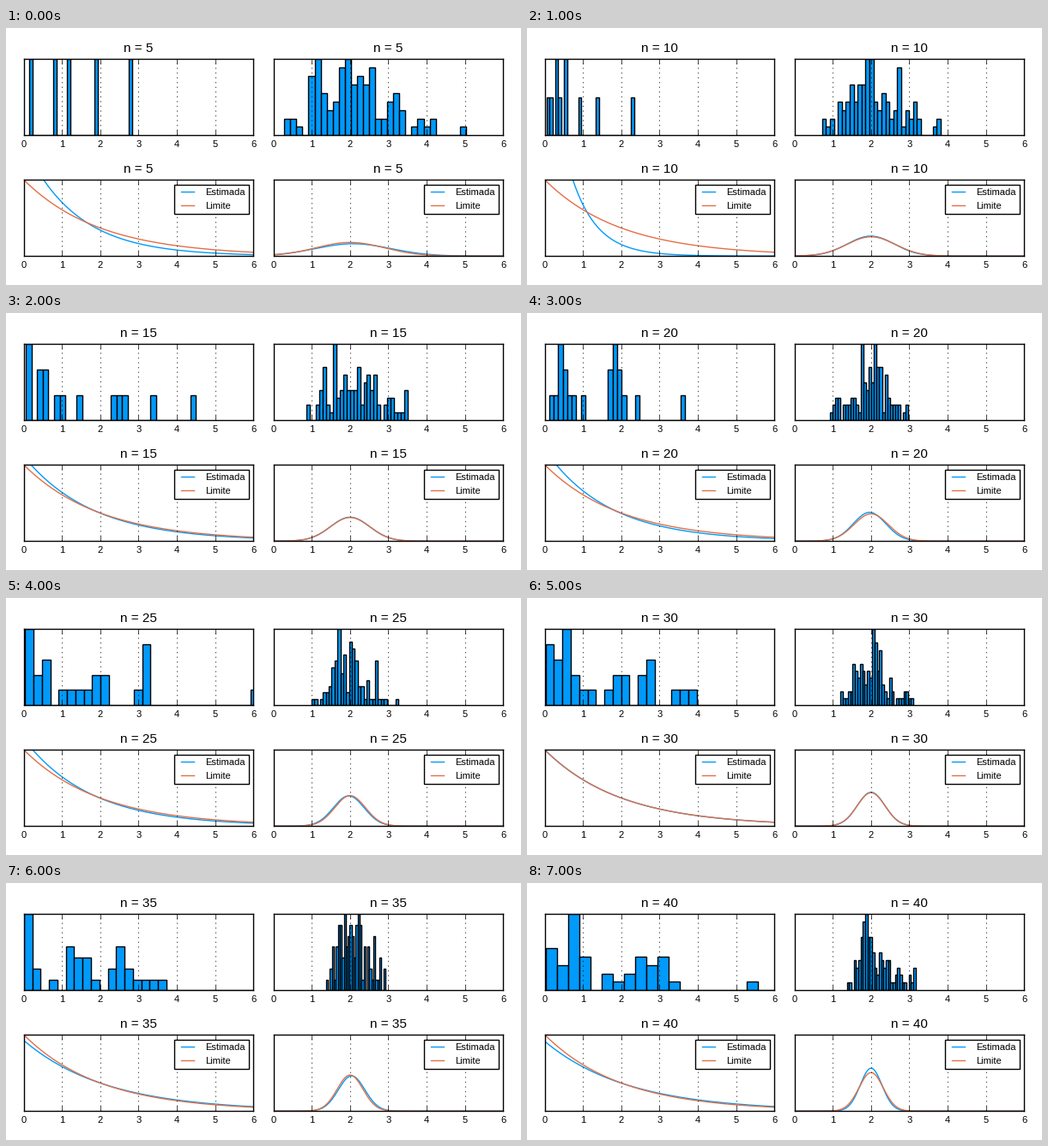
A matplotlib script that plays this animation: 600 by 300 pixels, repeating every 8000 ms.

```python
import numpy as np
import matplotlib.pyplot as plt
from matplotlib.animation import FuncAnimation

W, H, DPI = 600, 300, 100
BLUE, ORANGE = "#009afa", "#e26f47"
XMAX, BINS, MEAN, TRIALS = 6, 30, 2.0, 100

plt.rcParams.update({
    "font.family": "Liberation Sans",
    "lines.scale_dashes": False,
    "lines.linewidth": 1.0,
    "patch.linewidth": 1.0,
    "axes.linewidth": 1.0,
    "axes.axisbelow": False,
})

# n: sample range, sample mean, range of means, mean and spread of means
STAGES = {
    5: ((0.135, 2.84), 1.37, (0.28, 5.03), 2.08, 0.99),
    10: ((0.045, 2.33), 0.67, (0.72, 3.82), 1.99, 0.61),
    15: ((0.05, 4.5), 1.8, (0.85, 3.5), 2.0, 0.51),
    20: ((0.112, 3.67), 1.67, (0.93, 2.96), 1.96, 0.424),
    25: ((0.038, 6.59), 1.75, (0.99, 3.26), 1.965, 0.403),
    30: ((0.02, 6.6), 2.0, (1.2, 3.1), 2.0, 0.36),
    35: ((0.0, 6.585), 2.16, (1.37, 2.92), 2.04, 0.346),
    40: ((0.018, 8.8), 2.19, (1.37, 3.16), 2.0, 0.284),
}

fig = plt.figure(figsize=(W / DPI, H / DPI), dpi=DPI, facecolor="white")
xs = np.linspace(0, XMAX, 400)


def panel(x, y, w=267.42, h=89):
    return fig.add_axes([x / W, 1 - (y + h) / H, w / W, h / H])


COL1, COL2, ROW1, ROW2 = 20.74, 311.74, 36.3, 177.2
hist_sample, hist_means = panel(COL1, ROW1), panel(COL2, ROW1)
pdf_sample, pdf_means = panel(COL1, ROW2), panel(COL2, ROW2)


def spread(values, span, center):
    """Move values so that their ends meet span and their mean meets center."""
    knots = [values.min(), values.mean(), values.max()]
    return np.interp(values, knots, [span[0], center, span[1]])


def expo(mean):
    return np.exp(-xs / mean) / mean


def normal(mu, sd):
    return np.exp(-0.5 * ((xs - mu) / sd) ** 2) / (sd * np.sqrt(2 * np.pi))


def frame(ax, n, top):
    ax.set_xlim(0, XMAX)
    ax.set_ylim(0, top)
    ax.set_yticks([])
    ax.set_xticks(range(XMAX + 1))
    ax.tick_params(axis="x", direction="in", top=True, length=4, width=0.5,
                   pad=4, labelsize=8)
    ax.grid(axis="x", color="black", lw=0.5, ls=(0, (1, 3)))
    ax.set_title(f"n = {n}", fontsize=11, pad=6, y=1.0)


def draw_hist(ax, n, values, span):
    counts, _, _ = ax.hist(values, BINS, range=span, fc=BLUE, ec="black")
    frame(ax, n, counts.max())


def draw_curves(ax, n, estimate, limit, top):
    ax.plot(xs, estimate, color=BLUE, label="Estimada")
    ax.plot(xs, limit, color=ORANGE, label="Limite")
    ax.legend(loc="upper right", fontsize=8, numpoints=2, fancybox=False,
              framealpha=1, edgecolor="black")
    frame(ax, n, top)


def update(i):
    n = 5 * (i + 1)
    span, mean, means_span, mu, sd = STAGES[n]
    rng = np.random.default_rng(n)
    sample = spread(rng.exponential(mean, n), span, mean)
    means = spread(rng.normal(mu, sd, TRIALS), means_span, mu)

    for ax in fig.axes:
        ax.clear()
    draw_hist(hist_sample, n, sample, span)
    draw_hist(hist_means, n, means, means_span)
    draw_curves(pdf_sample, n, expo(mean), expo(MEAN), 0.5)
    draw_curves(pdf_means, n, normal(mu, sd),
                normal(MEAN, MEAN / np.sqrt(n)), 2.5)
    return []


anim = FuncAnimation(fig, update, frames=len(STAGES), interval=1000,
                     repeat=True, repeat_delay=0, init_func=lambda: update(0))
plt.show()
```
